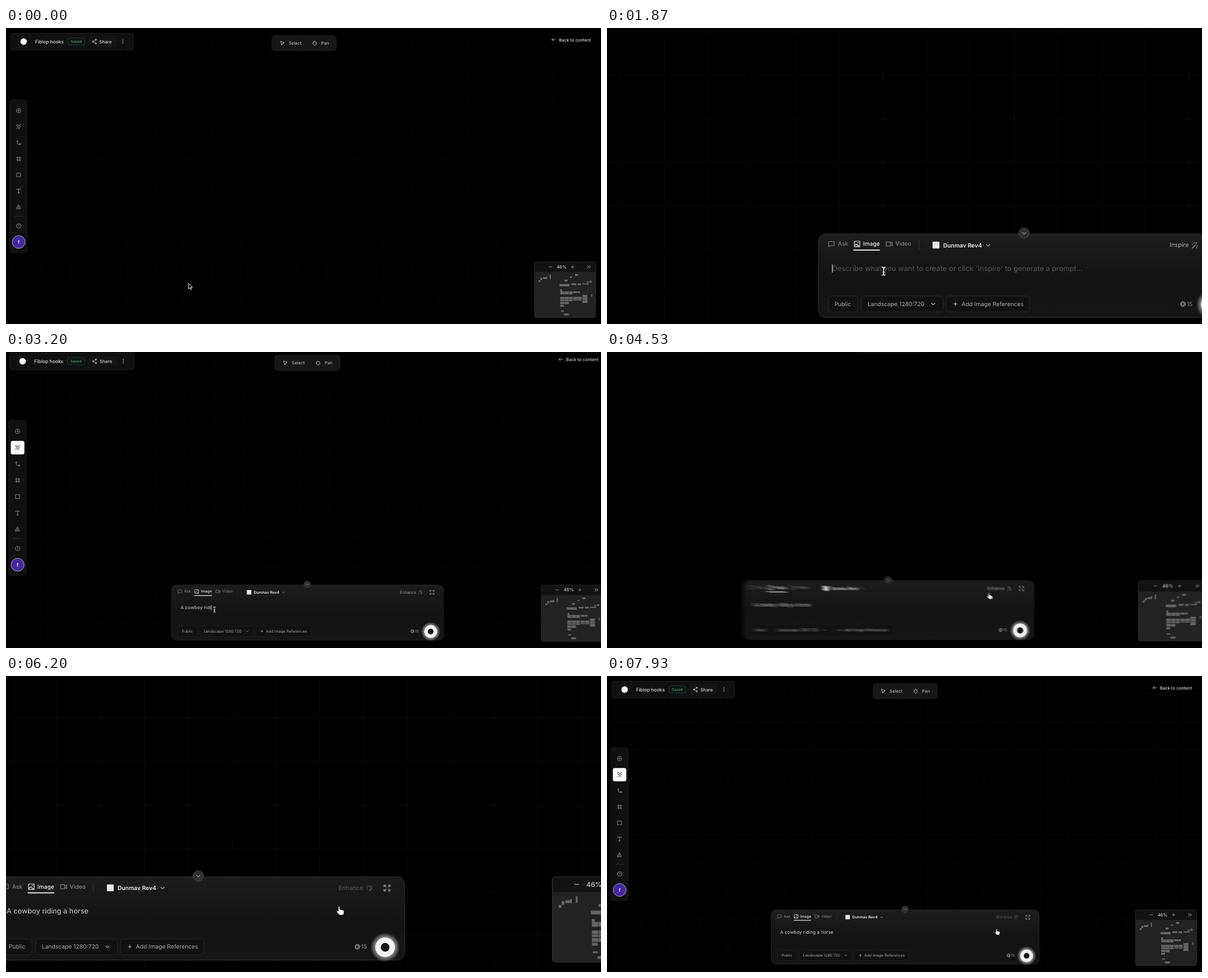
Write an HTML page that moves like this. It is 962 px wide and 480 px high and loops after 8 s.

```html
<!DOCTYPE html>
<html lang="en">
<head>
<meta charset="utf-8">
<title>Canvas prompt</title>
<style>
  html, body { margin: 0; width: 100%; height: 100%; overflow: hidden; background: #000; }
  svg { display: block; width: 100vw; height: 100vh; }
  text { font-family: Inter, Roboto, sans-serif; text-rendering: geometricPrecision; white-space: pre; }
  .icon { fill: none; stroke: #9a9a9a; stroke-width: .75; stroke-linecap: round; stroke-linejoin: round; }
  .lit { stroke: #d8d8d8; }
  .dim { stroke: #777; }
  .box { fill: #101010; stroke: #252525; stroke-width: .7; }
  .pill { fill: #111; stroke: #292929; stroke-width: .6; }
</style>
</head>
<body>
<svg id="stage" viewBox="0 0 962 480">
  <defs>
    <linearGradient id="sheet" x2="0" y2="1">
      <stop offset="0" stop-color="#1d1d1d"/><stop offset=".5" stop-color="#131313"/><stop offset="1" stop-color="#151515"/>
    </linearGradient>
    <radialGradient id="glow">
      <stop offset=".66" stop-color="#fff" stop-opacity=".5"/><stop offset="1" stop-color="#fff" stop-opacity="0"/>
    </radialGradient>
    <pattern id="grid" x="11" y="28" width="46" height="45.85" patternUnits="userSpaceOnUse">
      <path d="M0 .25H46M.25 0V46" stroke="#0d0d0d" stroke-width=".5"/>
    </pattern>
  </defs>
  <g class="layer"><g id="world"></g></g>
</svg>
<script>
const LOOP = 8000, STIFF = 0.0095, SHUTTER = 12, COPIES = 10;
const PROMPT = 'A cowboy riding a horse';
const TYPE_START = 2120, TYPE_STEP = 82, OPEN = 1100, CLICK = 5150;
const $ = id => document.getElementById(id);

const label = (x, y, s, size, fill = '#bbb', extra = '') =>
  `<text x="${x}" y="${y}" font-size="${size}" fill="${fill}" ${extra}>${s}</text>`;
const rect = (x, y, w, h, r, attrs) =>
  `<rect x="${x}" y="${y}" width="${w}" height="${h}" rx="${r}" ${attrs}/>`;
const circle = (x, y, r, attrs) => `<circle cx="${x}" cy="${y}" r="${r}" ${attrs}/>`;
const icon = (x, y, d, cls = '', attrs = '') =>
  `<path class="icon ${cls}" transform="translate(${x} ${y})" d="${d}" ${attrs}/>`;
const ring = r => `M${-r} 0a${r} ${r} 0 1 0 ${2 * r} 0a${r} ${r} 0 1 0 ${-2 * r} 0`;
const bold = 'font-weight="600"', medium = 'font-weight="500"', mid = 'text-anchor="middle"';

const CHEVRON = 'M-1.8 -.9L0 .9L1.8 -.9';
const SPARK = 'M.5 -3Q.8 0 3.2 .2Q.8 .6 .5 3.4Q.2 .6 -2.4 .2Q.2 0 .5 -3ZM-2.6 -3.6V-1.8M-3.5 -2.7H-1.7M3 -3.8V-2.4M-2.8 2.2V3.6';
const EXPAND = 'M-1 -1L-3 -3M-3.2 -1.2V-3.2H-1.2M1 -1L3 -3M3.2 -1.2V-3.2H1.2M-1 1L-3 3M-3.2 1.2V3.2H-1.2M1 1L3 3M3.2 1.2V3.2H1.2';
const WAND = 'M-2.8 3L1 -.8M-1.5 -2.5H.4M1.8 -3V-1.6M2.2 .6H3.4M-2.6 -.8V-.4M2 2V3';
const SHARE = 'M2 -2.6L-2.2 0L2 2.6M3.2 -3a1 1 0 1 0 -2 0a1 1 0 1 0 2 0M-1.4 0a1 1 0 1 0 -2 0a1 1 0 1 0 2 0M3.2 3a1 1 0 1 0 -2 0a1 1 0 1 0 2 0';
const PALM = 'M-2.2 .4V-1.6q.7 -.9 1.2 0V-2.5q.7 -.9 1.3 0V-2q.7 -.8 1.3 0V-1q.8 -.6 1.2 .2V1q-.2 2.4 -2.6 2.4Q-1.6 3.4 -3.2 .6Q-3 -.4 -2.2 .4';

function header() {
  return rect(8, 8.5, 198, 27, 3, 'class="box"')
    + circle(28.5, 22, 5.2, 'fill="#fff"')
    + label(47, 24.7, 'Fiblop hooks', 7.6, '#ddd', medium)
    + rect(100, 16, 27.3, 11.5, 3, 'fill="#0b1510" stroke="#28523c" stroke-width=".7"')
    + label(113.6, 24.1, 'Saved', 6, '#5fb487', mid)
    + rect(133, 13.5, 46, 17, 3, 'fill="#141414"')
    + icon(143, 22, SHARE, 'lit') + label(151, 24.6, 'Share', 7.2, '#ddd', medium)
    + [-2.8, 0, 2.8].map(d => circle(189, 22 + d, .75, 'fill="#ccc"')).join('')
    + rect(430, 12.3, 104, 24.5, 5, 'class="box" style="fill:#161616"')
    + icon(447, 24.5, 'M-2.8 -3L3 -.7L.4 .4L-.8 3Z', 'lit') + label(457, 27, 'Select', 7, '#ccc')
    + icon(499, 24.5, PALM, 'lit') + label(509.5, 27, 'Pan', 7, '#ccc')
    + icon(885.5, 19, 'M2.8 0H-2.8M-.6 -2.3L-2.8 0L-.6 2.3', 'lit')
    + label(894, 21.6, 'Back to content', 6.9, '#ddd', medium);
}

function sidebar() {
  const tools = [
    ring(3.6) + 'M-1.7 0H1.7M0 -1.7V1.7',
    '',
    'M-2.2 -1.6V1Q-2.2 2.4 0 2.2H1.2M-3 -2.6a.9 .9 0 1 0 1.8 0a.9 .9 0 1 0 -1.8 0M1.4 2.2a1.1 1.1 0 1 0 2.2 0a1.1 1.1 0 1 0 -2.2 0',
    'M-1.9 -3.5V3.5M1.9 -3.5V3.5M-3.5 -1.9H3.5M-3.5 1.9H3.5',
    'M-3.1 -3.1H3.1V3.1H-3.1Z',
    'M-3 -2V-3H3V-2M0 -3V3.2M-1.1 3.2H1.1',
    'M0 -3.6L1.7 -.6H-1.7ZM-3.2 .8H-.7V3.2H-3.2ZM.7 2a1.25 1.25 0 1 0 2.5 0a1.25 1.25 0 1 0 -2.5 0'
  ];
  return rect(6.3, 116.5, 27.6, 247.5, 4, 'class="box"')
    + rect(9.6, 149.2, 21.6, 21.6, 3, 'id="slot"')
    + tools.map((d, i) => icon(20.5, 134 + i * 26.05, d)).join('')
    + icon(20.5, 160, SPARK, '', 'id="spark"')
    + '<path d="M12.5 305.2H28" stroke="#3a3a3a" stroke-width=".7"/>'
    + icon(20.5, 321, ring(3.6)) + label(20.5, 323.1, '?', 5.8, '#aaa', mid)
    + circle(20.5, 347, 10.4, 'fill="#4727a0" stroke="#b8a8c8" stroke-width=".9"')
    + label(20.5, 349.7, 'f', 8, '#fff', mid + ' ' + medium)
    + '<g id="tip">' + rect(37.8, 148.8, 104.2, 31.8, 3.5, 'fill="#252525" stroke="#303030" stroke-width=".4"')
    + label(43.6, 162.4, 'Generation Mode', 7, '#e4e4e4', medium)
    + label(43.6, 172.9, 'Create AI images and videos', 5.95, '#a6a6a6') + '</g>';
}

function minimap() {
  const blocks = [
    [861, 409, 3, 3], [864, 405, 3, 4], [868, 404, 5, 3], [873, 403, 2, 4], [879, 400, 2, 7],
    [920, 399, 5, 3], [912, 403, 3, 2], [903, 408, 5, 3], [939, 411, 3, 2], [943, 410, 4, 3],
    [895, 415, 16, 4], [914, 414, 8, 3], [924, 414, 6, 3], [932, 414, 10, 2],
    [896, 424, 3, 3], [896, 427, 20, 5], [917, 427, 11, 3], [946, 432, 2, 4],
    [896, 436, 20, 7], [917, 436, 14, 6], [932, 433, 8, 13], [896, 444, 14, 4],
    [896, 449, 6, 3], [897, 458, 5, 2], [902, 463, 8, 3]
  ];
  return rect(854.4, 379.4, 99, 90, 3, 'fill="#222" stroke="#333" stroke-width=".7"')
    + '<path d="M855 395.5V382q0 -2.2 2.2 -2.2H951q2.2 0 2.2 2.2V395.5Z" fill="#121212"/>'
    + icon(880, 387.3, 'M-2.2 0H2.2') + label(898.3, 389.8, '46%', 7.1, '#ccc', mid + ' ' + medium)
    + icon(916, 387.3, 'M-2.3 0H2.3M0 -2.3V2.3')
    + icon(942.5, 387.3, 'M-2.5 -2L-.4 0L-2.5 2M.4 -2L2.5 0L.4 2', 'lit')
    + blocks.map(([x, y, w, h]) => rect(x, y, w, h, 0, 'fill="#656565"')).join('')
    + '<path d="M896 440H931M903 427V448M910 427V448M924 427V442M932 437H940M932 441H940" stroke="#2c2c2c" stroke-width=".6"/>';
}

function panel() {
  return '<g id="panel">' + rect(265.4, 379.2, 433.4, 88, 8, 'fill="url(#sheet)" stroke="#2b2b2b" stroke-width=".7"')
    + circle(481.8, 378.4, 5.7, 'fill="#303030" stroke="#444" stroke-width=".4"') + icon(481.8, 378.4, CHEVRON)
    + icon(279, 389.8, 'M-2.8 -2.6H2.8V1.8H-1.2L-2.8 3.2Z', 'dim') + label(285.8, 391.7, 'Ask', 6.1, '#909090')
    + icon(306, 389.8, 'M-2.9 -2.9H2.9V2.9H-2.9ZM-2.9 2L-.6 0L2.4 2.8M.6 -1.3h1', 'lit') + label(312.4, 391.7, 'Image', 6, '#eee', medium)
    + '<path d="M302 396.2H330" stroke="#eee" stroke-width="1.1"/>'
    + icon(340, 389.8, 'M-3.3 -2.2H1V2.2H-3.3ZM1 -.4L3.2 -1.8V1.8L1 .4', 'dim') + label(346.4, 391.7, 'Video', 6.1, '#909090')
    + '<path d="M371.2 385.8V396.4" stroke="#333" stroke-width=".7"/>'
    + rect(385.5, 387.4, 7.2, 7.2, .6, 'fill="#e8e8e8"')
    + label(396.6, 393.3, 'Dunmav Rev4', 6.1, '#eee', bold) + icon(444, 391.2, CHEVRON)
    + label(655.2, 393.2, '', 6.3, '#aaa', 'id="assist" text-anchor="end"')
    + icon(661.5, 391.2, WAND, '', 'id="wand"')
    + '<g id="loader" transform="translate(661.5 391.2)"><g id="spin"></g></g>'
    + icon(680.4, 391.2, EXPAND)
    + label(280, 418.2, "Describe what you want to create or click 'Inspire' to generate a prompt...", 7.6, '#555', 'id="hint"')
    + label(280, 418.1, '', 7.5, '#d0d0d0', 'id="typed"')
    + rect(0, 411.4, .8, 8.6, 0, 'id="caret" fill="#ccc"')
    + rect(276, 444.8, 30.6, 16.8, 3, 'class="pill"') + label(282.2, 455.2, 'Public', 6, '#a8a8a8')
    + rect(310.5, 444.8, 86, 16.8, 3, 'class="pill"') + label(317, 455.2, 'Landscape 1280:720', 6.1, '#a8a8a8') + icon(386.2, 453.2, CHEVRON)
    + rect(399.7, 444.8, 87.8, 16.8, 3, 'class="pill"') + icon(409.6, 453.1, 'M-1.8 0H1.8M0 -1.8V1.8') + label(416, 455.2, 'Add Image References', 6.1, '#a8a8a8')
    + circle(649.2, 453.2, 2.9, 'fill="#777"') + icon(649.2, 453.2, 'M-.9 -1.2V1.2M1 -1.2L-.7 0L1 1.2', '', 'style="stroke:#1a1a1a"')
    + label(653.2, 455.3, '15', 6, '#999')
    + circle(678.4, 453.7, 15.5, 'fill="url(#glow)"') + circle(678.4, 453.7, 10.3, 'fill="#f2f2f2"')
    + circle(678.4, 453.7, 4.6, 'fill="#161616"') + '</g>';
}

function pointers() {
  const hand = 'M-1 0q1 -.9 1.7 0V3.2q.9 -.6 1.6 .2q1 -.4 1.5 .4q1.2 -.2 1.3 .9V6.3Q5 8.6 3.6 9H.3Q-1.4 7 -3 5.2Q-2.6 3.8 -1 5Z';
  return '<g id="cursor">'
    + '<path id="arrow" d="M0 0V9L2.1 7.1L3.5 10.1L4.9 9.4L3.5 6.5H6.3Z" fill="#000" stroke="#fff" stroke-width=".9"/>'
    + `<path id="hand" d="${hand}" fill="#fff" stroke="#000" stroke-width=".5"/>`
    + '<path id="beam" d="M-2 -4.3Q0 -4.2 0 -3V3Q0 4.2 -2 4.3M2 -4.3Q0 -4.2 0 -3M0 3Q0 4.2 2 4.3M-1.2 1H1.2" fill="none" stroke="#f0f0f0" stroke-width=".9"/>'
    + '</g>';
}

$('world').innerHTML = rect(0, 0, 962, 480, 0, 'fill="#000"')
  + '<path d="M0 0H4Q0 0 0 4ZM962 0H958Q962 0 962 4Z" fill="#3a2a78"/>'
  + rect(0, 0, 962, 475, 0, 'fill="url(#grid)"')
  + header() + sidebar() + minimap() + panel() + pointers();

$('spin').innerHTML = Array.from({ length: 8 }, (_, i) =>
  `<path d="M0 1.5V3.4" transform="rotate(${i * 45})" stroke="#888" stroke-width=".7" opacity="${0.3 + i * 0.1}"/>`).join('');

for (let i = 1; i < COPIES; i++) {
  $('stage').insertAdjacentHTML('beforeend', `<g class="layer" opacity="${1 / (i + 1)}"><use href="#world"/></g>`);
}
const layers = [...document.querySelectorAll('.layer')];

// Camera goals: start time, scale, x, y
const SHOTS = [
  [250, 1.536, 0, -159.3],
  [1443, 1.536, -72, -257],
  [2630, 1, 0, 0],
  [4456, 1.536, -429, -257],
  [6650, 1, 0, 0]
];
// Pointer moves: start, end, x, y
const MOVES = [
  [200, 880, 20.7, 161.7],
  [1380, 1780, 334, 418.5],
  [4020, 4490, 632, 398],
  [5250, 5600, 630, 410.8]
];

const mix = (a, b, p) => a + (b - a) * p;
const spring = dt => { const x = Math.max(0, dt) * STIFF; return 1 - (1 + x) * Math.exp(-x); };
const smooth = p => { p = Math.min(1, Math.max(0, p)); return p * p * (3 - 2 * p); };
const show = (id, on) => $(id).setAttribute('display', on ? 'inline' : 'none');

const camera = t => SHOTS.reduce((cam, [at, ...goal]) =>
  cam.map((v, i) => mix(v, goal[i], spring(t - at))), [1, 0, 0]);

const pointer = t => MOVES.reduce(([x, y], [a, b, gx, gy]) => {
  const p = smooth((t - a) / (b - a));
  return [mix(x, gx, p), mix(y, gy, p)];
}, [295, 414]);

const pointerKind = t =>
  t < 830 ? 'arrow' : t < 1430 ? 'hand' : t < 1640 ? 'arrow' : t < 4150 ? 'beam' : t < 4400 ? 'arrow' : 'hand';

function moveCamera(t) {
  const far = camera(t - SHUTTER), now = camera(t);
  const shift = Math.max(...[[0, 0], [962, 480]].map(([x, y]) =>
    Math.hypot((now[0] - far[0]) * x + now[1] - far[1], (now[0] - far[0]) * y + now[2] - far[2])));
  const blurred = shift > 1.2;
  layers.forEach((layer, i) => {
    layer.setAttribute('display', i && !blurred ? 'none' : 'inline');
    const [s, x, y] = camera(blurred ? t - SHUTTER * (i / (COPIES - 1) - .5) : t);
    layer.setAttribute('transform', `matrix(${s} 0 0 ${s} ${x} ${y})`);
  });
}

function draw(t) {
  const typed = PROMPT.slice(0, Math.max(0, Math.floor((t - TYPE_START) / TYPE_STEP)));
  const hover = t > 830 && t < 1430, active = t >= 1430, busy = t > CLICK;

  show('panel', t > OPEN);
  $('panel').setAttribute('opacity', smooth((t - OPEN) / 120));
  show('tip', hover);
  show('slot', hover || active);
  $('slot').setAttribute('fill', active ? '#fff' : '#232323');
  $('spark').style.stroke = active ? '#222' : hover ? '#eee' : '';

  $('typed').textContent = typed;
  show('hint', !typed);
  show('caret', t > 1780 && t < 4200);
  $('caret').setAttribute('x', 279.6 + (typed ? $('typed').getComputedTextLength() + .6 : 0));
  $('assist').textContent = typed ? 'Enhance' : 'Inspire';
  $('assist').setAttribute('fill', busy ? '#5c5c5c' : '#b0b0b0');
  show('wand', !busy);
  show('loader', busy);
  $('spin').setAttribute('transform', `rotate(${(t - CLICK) * .36})`);

  const [x, y] = pointer(t), kind = pointerKind(t);
  $('cursor').setAttribute('transform', `translate(${x} ${y})`);
  ['arrow', 'hand', 'beam'].forEach(k => show(k, k === kind));
  moveCamera(t);
}

function tick() {
  draw(performance.now() % LOOP);
  requestAnimationFrame(tick);
}
tick();
</script>
</body>
</html>
```
